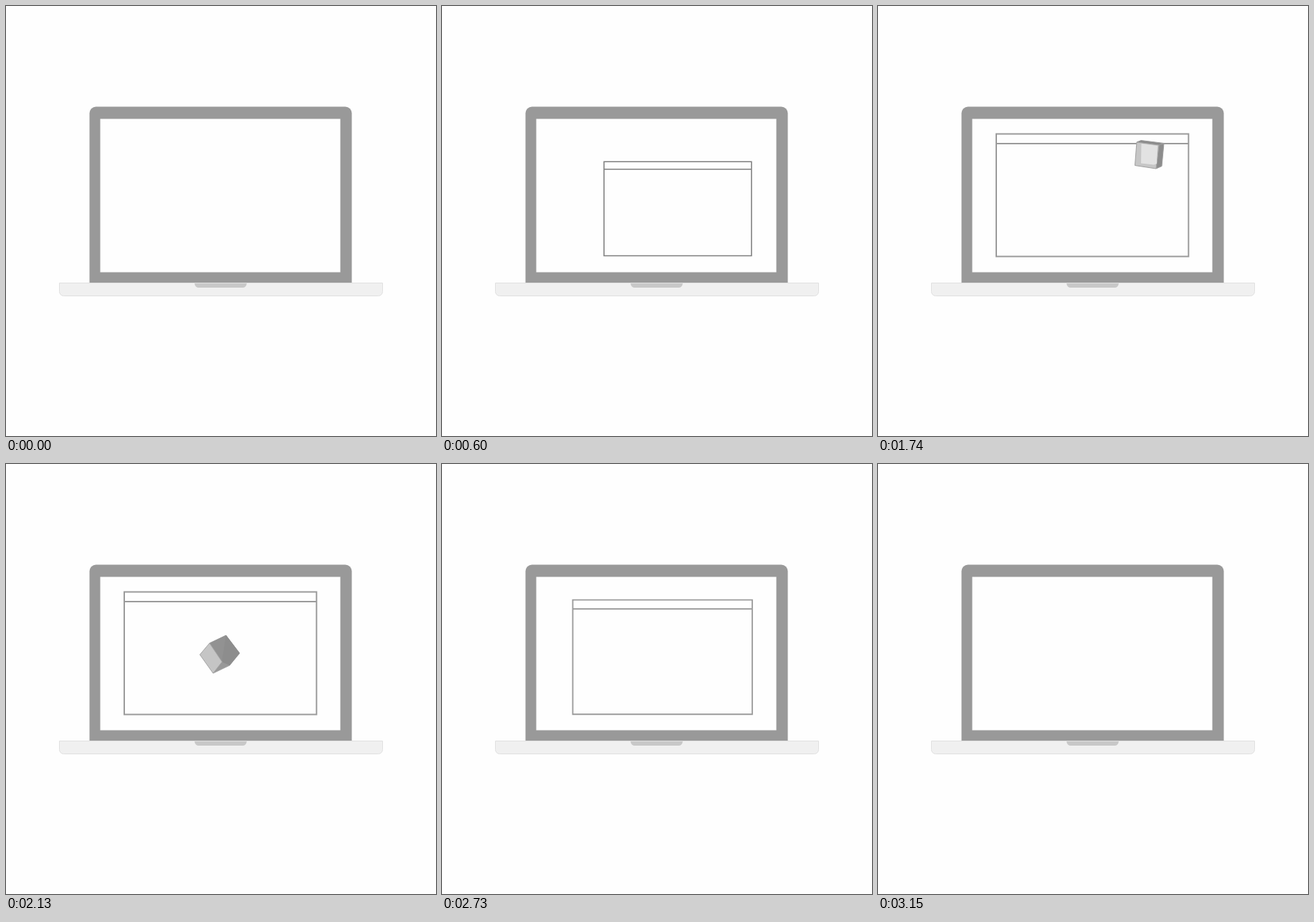
An HTML page that plays this animation: 600 px wide and 600 px high, repeating every 3.18 s.

```html
<!DOCTYPE html>
<html lang="en">
<head>
<meta charset="utf-8">
<title>Laptop window</title>
<style>
  html, body { margin: 0; width: 100%; height: 100%; overflow: hidden; background: #fefefe; }
  svg { display: block; width: 100%; height: 100%; }
</style>
</head>
<body>
<svg viewBox="0 0 600 600">
  <path d="M116.5 387V149.5a9 9 0 0 1 9-9h348a9 9 0 0 1 9 9V387z" fill="#999"/>
  <path d="M131.5 157.5h335v214h-335z" fill="#fefefe"/>
  <path d="M74.5 386.5h451v12a6 6 0 0 1-6 6h-439a6 6 0 0 1-6-6z" fill="#f0f0f0" stroke="#e0e0e0"/>
  <path d="M263 387h73q-1 6-6 6h-61q-5 0-6-6z" fill="#c8c8c8"/>

  <path id="window" d="M165 178.5h268.3v171h-268.3zM165 192h268.3" fill="none" stroke-width="2"/>

  <g id="front" stroke="#a0a0a0" stroke-linejoin="round">
    <path d="M361 190l6-2.500 32 4-7 3z" fill="#8a8a8a"/>
    <path d="M392 194l7-2.500-3 32-8 3.500z" fill="#8c8c8c"/>
    <path d="M361 190l31 4-4 33-29.500-4.500z" fill="#c6c6c6"/>
    <path d="M367.500 192l22.500 3-1 25-4 1.500-18-2z" fill="#e2e2e2" stroke="none"/>
  </g>

  <g id="tilted" stroke="#a4a4a4" stroke-linejoin="round">
    <path d="M284 250l23-11 19 25-14 17-23 11z" fill="#999"/>
    <path d="M284 250l23-11 19 25-25 12z" fill="#929292" stroke="none"/>
    <path d="M307 239l19 25-14 17-11-5z" fill="#8d8d8d" stroke="none"/>
    <path d="M270.500 266l13.500-16 17.500 26-12.500 16z" fill="#c5c5c5"/>
  </g>
</svg>
<script>
const LOOP = 3180, STEP = 30;
const [win, front, tilted] = ['window', 'front', 'tilted'].map(id => document.getElementById(id));
const clamp = v => Math.min(1, Math.max(0, v));

function place(el, visible, transform) {
  el.style.display = visible ? '' : 'none';
  el.setAttribute('transform', transform);
}

const scaleAbout = (x, y, s) => `translate(${x} ${y}) scale(${s}) translate(${-x} ${-y})`;

function drawWindow(t) {
  const opening = clamp((t - 450) / 390);
  const size = t < 2700 ? 1 - (1 - opening) ** 3 : clamp((3150 - t) / 450);
  const grey = Math.round(108 + 47 * opening);
  win.setAttribute('stroke', `rgb(${grey},${grey},${grey})`);
  place(win, size > 0, scaleAbout(427, 345, size));
}

function drawCube(t) {
  const flight = clamp((t - 1740) / 60);
  place(front, t >= 1740 && t < 1800,
    `translate(${-81 * flight} ${59 * flight}) rotate(${-30 * flight} 379 207)`);

  const resting = t < 2130;
  const size = resting ? 0.95 : clamp((2250 - t) / 120);
  const turn = resting ? 8 : (2130 - t) / 4;
  place(tilted, t >= 1800 && size > 0,
    `${scaleAbout(298, 266, size)} rotate(${turn} 298 266)`);
}

function draw(now) {
  const t = Math.floor((now % LOOP) / STEP) * STEP;
  drawWindow(t);
  drawCube(t);
}

const start = performance.now();
function tick() {
  draw(performance.now() - start);
  requestAnimationFrame(tick);
}
tick();
</script>
</body>
</html>
```
